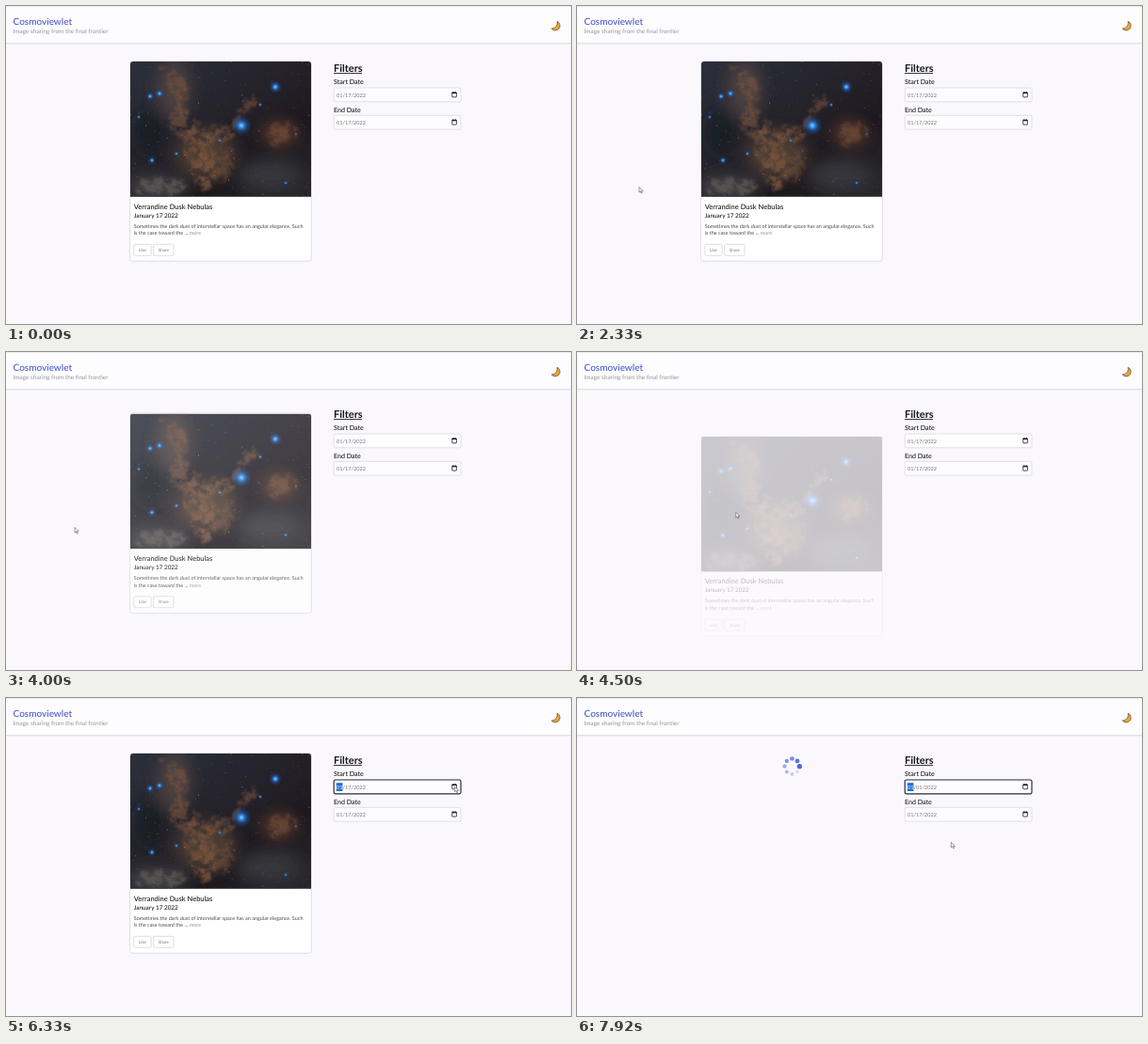
Write an HTML page that moves like this. It is 600 px wide and 338 px high and loops after 8000 ms.

```html
<!DOCTYPE html>
<html lang="en">
<head>
<meta charset="utf-8">
<title>Space photo feed</title>
<style>
  html, body { margin: 0; width: 100%; height: 100%; overflow: hidden; background: #faf8fc; }
  svg { display: block; width: 100vw; height: 100vh; }
  text { font-family: Lato, "Open Sans", sans-serif; fill: #161618; text-rendering: geometricPrecision; }
  .medium { font-weight: 500; }
  .field { fill: #fdfcfe; stroke: #dcdade; stroke-width: .8; }
  .field.focus { stroke: #2b2b33; stroke-width: 1.2; }
  .date { font-size: 5.6px; fill: #77757b; }
  .body { font-size: 5.46px; fill: #48464c; }
  .button rect { fill: #fff; stroke: #cfcdd2; stroke-width: .7; }
  .button text { font-size: 4.5px; fill: #77757b; text-anchor: middle; }
</style>
</head>
<body>
<svg id="stage" viewBox="0 0 600 338">
  <defs>
    <clipPath id="photoClip"><path d="M132 202.7V62q0-3 3-3h186q3 0 3 3v140.7z"/></clipPath>
    <linearGradient id="sky" x2="1" y2="1">
      <stop offset="0" stop-color="#2b303c"/><stop offset=".45" stop-color="#25222a"/>
      <stop offset=".7" stop-color="#1d191f"/><stop offset="1" stop-color="#29282d"/>
    </linearGradient>
    <radialGradient id="glow">
      <stop offset="0" stop-color="#8fd0fa"/><stop offset=".25" stop-color="#2f85dc"/>
      <stop offset=".55" stop-color="#1f5cb0" stop-opacity=".5"/><stop offset="1" stop-color="#1c488c" stop-opacity="0"/>
    </radialGradient>
    <filter id="dust" x="-20%" y="-20%" width="140%" height="140%" color-interpolation-filters="sRGB">
      <feTurbulence type="fractalNoise" baseFrequency=".07" numOctaves="4" seed="8" result="noise"/>
      <feDisplacementMap in="SourceGraphic" in2="noise" scale="20" xChannelSelector="R" yChannelSelector="G"/>
      <feGaussianBlur stdDeviation="1.8" result="cloud"/>
      <feTurbulence type="fractalNoise" baseFrequency=".11" numOctaves="4" seed="3"/>
      <feColorMatrix values="0 0 0 0 0  0 0 0 0 0  0 0 0 0 0  0 0 0 3.4 -1" result="wisps"/>
      <feComposite in="cloud" in2="wisps" operator="in"/>
    </filter>
    <filter id="haze" x="-40%" y="-40%" width="180%" height="180%"><feGaussianBlur stdDeviation="8"/></filter>
  </defs>

  <rect width="600" height="338" fill="#faf8fc"/>
  <rect width="600" height="39.5" fill="#fdfcfe"/>
  <path d="M0 .4H600" stroke="#e6e5e8" stroke-width=".8"/>
  <path d="M0 39.8H600" stroke="#d9d8dc"/>
  <text x="7.6" y="19.6" font-size="10" class="medium" style="fill:#4a5bd0">Cosmoviewlet</text>
  <text x="7.6" y="29.2" font-size="6.4" style="fill:#98969d">Image sharing from the final frontier</text>
  <path d="M585.2 16.3A5 5 0 1 1 579.3 24A6 6 0 0 0 585.2 16.3Z" fill="#eda936" stroke="#59432c" stroke-width=".7"/>

  <g id="card">
    <rect x="131.6" y="58.6" width="192.8" height="212.6" rx="3" fill="#fff" stroke="#d8d6da" stroke-width=".8"/>
    <g clip-path="url(#photoClip)">
      <rect x="132" y="59" width="192" height="144" fill="url(#sky)"/>
      <g filter="url(#haze)">
        <ellipse cx="290" cy="136" rx="18" ry="13" fill="#57392a"/>
        <ellipse cx="178" cy="88" rx="18" ry="32" fill="#4b4140"/>
        <ellipse cx="212" cy="158" rx="32" ry="26" fill="#4a3a31"/>
        <ellipse cx="160" cy="193" rx="32" ry="12" fill="#42434a"/>
        <ellipse cx="280" cy="180" rx="34" ry="18" fill="#34343a"/>
        <ellipse cx="153" cy="135" rx="14" ry="24" fill="#191a22"/>
      </g>
      <g filter="url(#dust)" fill="#80583f">
        <path d="M162 60L178 66L194 96L190 119L214 132L237 126L252 103L264 95L268 104L254 113L241 139L221 148L225 177L209 196L196 176L190 144L173 124L182 104Z" opacity=".55"/>
        <path d="M186 112L196 126L214 139L230 134L217 148L206 160L198 150Z" opacity=".4"/>
        <path d="M135 190Q165 175 192 188L185 198L140 201Z" fill="#6a6058" opacity=".6"/>
        <path d="M205 150L220 168L236 150L247 166L222 190L200 192Z" opacity=".45"/>
        <path d="M276 128Q292 116 308 132L298 148L280 146Z" opacity=".45"/>
      </g>
      <g id="stars"></g>
    </g>
    <text x="135.7" y="215.7" font-size="7.5" class="medium">Verrandine Dusk Nebulas</text>
    <text x="135.7" y="224.7" font-size="6.4" class="medium">January 17 2022</text>
    <text x="135.7" y="235.5" class="body">Sometimes the dark dust of interstellar space has an angular elegance. Such</text>
    <text x="135.7" y="243.2" class="body">is the case toward the ... <tspan fill="#929096">more</tspan></text>
    <g class="button"><rect x="135.8" y="253.3" width="18.4" height="12" rx="1.6"/><text x="145" y="261">Like</text></g>
    <g class="button"><rect x="156.6" y="253.3" width="21.4" height="12" rx="1.6"/><text x="167.3" y="261">Share</text></g>
  </g>

  <g id="spinner"></g>

  <text x="348" y="70" font-size="11" font-weight="700">Filters</text>
  <path d="M348 71.6H378" stroke="#161618" stroke-width=".9"/>
  <text x="348" y="83.2" font-size="7.1" class="medium">Start Date</text>
  <rect id="startField" class="field" x="348.2" y="87" width="134.8" height="14.8" rx="1.5"/>
  <rect id="selection" x="350.8" y="90.2" width="6.6" height="8.8" fill="#1b6fd1"/>
  <text x="351" y="96.8" class="date"><tspan id="month">01</tspan>/<tspan id="day">17</tspan>/2022</text>
  <text x="348" y="112.5" font-size="7.1" class="medium">End Date</text>
  <rect class="field" x="348.2" y="116.3" width="134.8" height="14.8" rx="1.5"/>
  <text x="351" y="126.1" class="date">01/17/2022</text>
  <g id="icons"></g>
  <path id="cursor" d="M0 0V5.7L1.3 4.5L2.3 6.7L3.2 6.3L2.3 4.2H4.1Z" fill="#fff" stroke="#55535a" stroke-width=".6"/>
</svg>
<script>
const LOOP = 8000;
const APPEAR = 830, FOCUS = 6100, PICK = 7600;
const $ = id => document.getElementById(id);

function add(parent, tag, attrs) {
  const node = document.createElementNS(parent.namespaceURI, tag);
  for (const key in attrs) node.setAttribute(key, attrs[key]);
  return parent.appendChild(node);
}

let seed = 41;
const random = () => (seed = (seed * 16807) % 2147483647) / 2147483647;
for (let i = 0; i < 500; i++) {
  add($('stars'), 'circle', {
    cx: 132 + random() * 192, cy: 59 + random() * 144, r: .2 + random() ** 3 * .4,
    fill: random() < .3 ? '#86b9ee' : '#c6b9b5', opacity: .2 + random() * .4
  });
}
const blueStars = [[250, 127, 11], [286, 86, 7], [153, 96, 4.5], [163, 93, 5], [155, 164, 4],
  [181, 157, 3], [141, 118, 2.5], [297, 188, 2.5], [227, 143, 2.5], [270, 105, 2.5], [308, 136, 1.5]];
for (const [cx, cy, r] of blueStars) add($('stars'), 'circle', { cx, cy, r, fill: 'url(#glow)' });

for (const y of [91.9, 121.2]) {
  add($('icons'), 'rect', { x: 473.8, y, width: 4.6, height: 4.9, rx: .4, fill: 'none', stroke: '#111', 'stroke-width': .75 });
  add($('icons'), 'path', { d: `M473.6 ${y + .6}h5M474.8 ${y - .7}v1M477.4 ${y - .7}v1`, stroke: '#111' });
}

const dots = Array.from({ length: 8 }, (_, k) => {
  const angle = k * Math.PI / 4;
  return add($('spinner'), 'circle', {
    cx: 228.4 + 7.9 * Math.cos(angle), cy: 72.7 + 8.2 * Math.sin(angle), fill: '#4c66d8'
  });
});

// time, x, y of the pointer tip
const pointerPath = [[830, 54, 211], [1080, 55.6, 208.7], [2330, 66, 192.4], [3300, 73, 186.4],
  [4250, 73, 186.4], [5000, 440, 125], [5330, 461.8, 118.2], [5920, 475.5, 94], [6330, 476.5, 94],
  [6750, 476.5, 94], [7580, 420, 142], [7850, 397.3, 153.3]];
// time, progress out of view (0 at rest, 1 gone)
const cardPath = [[3930, 0], [4370, 1], [4420, 1], [5080, 0]];

const clamp = v => Math.min(1, Math.max(0, v));
const smooth = p => p * p * (3 - 2 * p);
const easeOut = p => 1 - (1 - p) ** 2;

function sample(path, t, ease) {
  let i = 0;
  while (i < path.length - 2 && t >= path[i + 1][0]) i++;
  const [from, ...a] = path[i], [to, ...b] = path[i + 1];
  const p = ease(clamp((t - from) / (to - from)));
  return a.map((v, k) => v + (b[k] - v) * p);
}

function draw(t) {
  const focused = t >= FOCUS, picked = t >= PICK;
  const [away] = sample(cardPath, t, t < 4420 ? clamp : easeOut);
  $('card').setAttribute('transform', `translate(0 ${40 * away})`);
  $('card').setAttribute('opacity', picked ? 0 : 1 - away);

  const [x, y] = sample(pointerPath, t, smooth);
  $('cursor').setAttribute('transform', `translate(${x} ${y})`);
  $('cursor').style.display = t < APPEAR ? 'none' : '';

  $('startField').classList.toggle('focus', focused);
  $('selection').style.display = focused ? '' : 'none';
  $('month').style.fill = focused ? '#fff' : '';
  $('day').textContent = picked ? '01' : '17';

  $('spinner').style.display = picked ? '' : 'none';
  dots.forEach((dot, k) => {
    const turn = (t - 7920) / 1000 - k / 8;
    const age = turn - Math.floor(turn);
    dot.setAttribute('r', 2.6 - age);
    dot.setAttribute('opacity', 1 - .9 * age);
  });
}

const start = performance.now();
function frame() {
  draw((performance.now() - start) % LOOP);
  requestAnimationFrame(frame);
}
frame();
</script>
</body>
</html>
```
